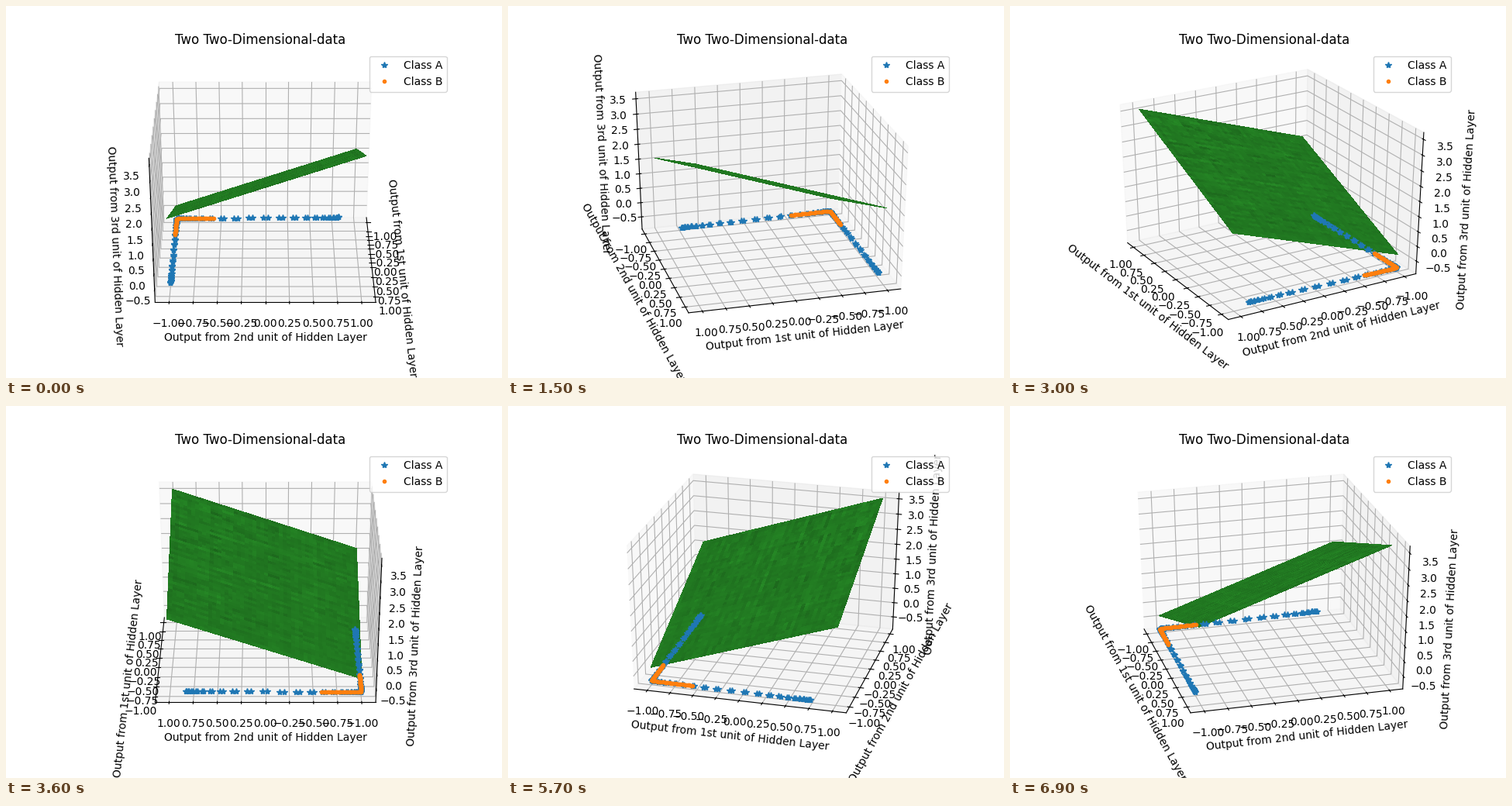
Write a matplotlib script that moves like this. It is 640x480 px and loops after 7.2 s.

```python
import numpy as np
import matplotlib.pyplot as plt
from matplotlib.animation import FuncAnimation
from matplotlib.colors import to_rgb
from mpl_toolkits.mplot3d import Axes3D

LOW = np.array([-1.1, -1.1, -0.84])
HIGH = np.array([1.1, 1.1, 3.62])
SPAN = HIGH - LOW
DIST = 10
FRAMES, INTERVAL = 24, 300


class WideAxes(Axes3D):
    """3D axes that project a unit cube and stretch it over the whole subplot."""

    def apply_aspect(self, position=None):
        pass

    def get_proj(self):
        world = np.diag([*(1 / SPAN), 1])
        world[:3, 3] = -LOW / SPAN

        az, el = np.deg2rad([self.azim, self.elev])
        ray = np.array([np.cos(az) * np.cos(el), np.sin(az) * np.cos(el), np.sin(el)])
        # the tiny shift settles which wall is the far one in edge-on views
        offset = DIST * ray + [1e-6, 1e-6, 0]
        back = offset / np.linalg.norm(offset)
        right = np.cross([0, 0, 1], back)
        right /= np.linalg.norm(right)
        turn = np.array([right, np.cross(back, right), back])
        view = np.eye(4)
        view[:3, :3] = turn
        view[:3, 3] = -turn @ (0.5 + offset)

        persp = np.array([[1, 0, 0, 0], [0, 1, 0, 0], [0, 0, 0, -DIST], [0, 0, -1, 0]])
        return persp @ view @ world


def height(level):
    return LOW[2] + SPAN[2] * level


def plane_level(x, y):
    return 0.557 + 0.2230 * x + 0.2208 * y


def draw_plane(ax, n=50):
    rng = np.random.default_rng(4)
    x, y = np.meshgrid(np.linspace(-1, 1, n), np.linspace(-1, 1, n))
    level = plane_level(x, y)
    m = n - 1
    streaks = rng.normal(size=(m // 3 + 1, m)).repeat(3, axis=0)[:m]
    grain = (streaks + 0.6 * rng.normal(size=(m, m))
             + 0.6 * rng.normal(size=(1, m)) + 0.5 * rng.normal(size=(m, 1)))
    shade = np.clip(0.75 + 0.035 * (0.35 + 0.65 * level[:-1, :-1]) * grain, 0.5, 1)
    ax.plot_surface(x, y, height(level), facecolors=shade[..., None] * np.array(to_rgb("C2")),
                    shade=False, linewidth=0, antialiased=False, zorder=1)


def draw_arms(ax, xs, ys, marker, **style):
    """Two arms leaving the corner (-1, -1), one along x and one along y."""
    x = np.concatenate([xs, np.full(len(ys), -1.0)])
    y = np.concatenate([np.full(len(xs), -1.0), ys])
    z = height(0.011 + 0.006 * (y + 1) - 0.006 * (x + 1))
    ax.plot(x, y, z, marker, **style)


def pairs(t, gap):
    return np.concatenate([t, t - gap])


fig = plt.figure(figsize=(6.4, 4.8), dpi=100)
ax = fig.add_subplot(axes_class=WideAxes, computed_zorder=False)

x_arm = -0.115 + 0.885 * np.tanh(pairs(0.17 * np.arange(-14, 12), 0.03))
y_arm = -0.06 + 0.94 * np.tanh(pairs(-0.092 + 0.185 * np.arange(-13, 11), 0.05))
draw_arms(ax, x_arm, y_arm, "*", color="C0", label="Class A", zorder=2)
draw_arms(ax, np.linspace(-0.985, -0.545, 40), np.linspace(-0.985, -0.585, 40),
          ".", color="C1", label="Class B", zorder=2.1)
draw_plane(ax)

ax.set_xticks(np.linspace(-1, 1, 9))
ax.set_yticks(np.linspace(-1, 1, 9))
ax.set_zticks(np.linspace(-0.5, 3.5, 9))
pad = SPAN / 48
ax.set_xlim(LOW[0] - pad[0], HIGH[0] + pad[0])
ax.set_ylim(LOW[1] - pad[1], HIGH[1] + pad[1])
ax.set_zlim(LOW[2] - pad[2], HIGH[2] + pad[2])

ax.set_xlabel("Output from 1st unit of Hidden Layer")
ax.set_ylabel("Output from 2nd unit of Hidden Layer")
ax.set_zlabel("Output from 3rd unit of Hidden Layer")
ax.set_title("Two Two-Dimensional-data")
ax.title.set_y(0.92)
ax.legend(loc="upper right")


def update(i):
    ax.view_init(elev=30, azim=i * 360 / FRAMES)
    return []


anim = FuncAnimation(fig, update, frames=FRAMES, interval=INTERVAL,
                     init_func=lambda: update(0), repeat=True, repeat_delay=0)
plt.show()
```
